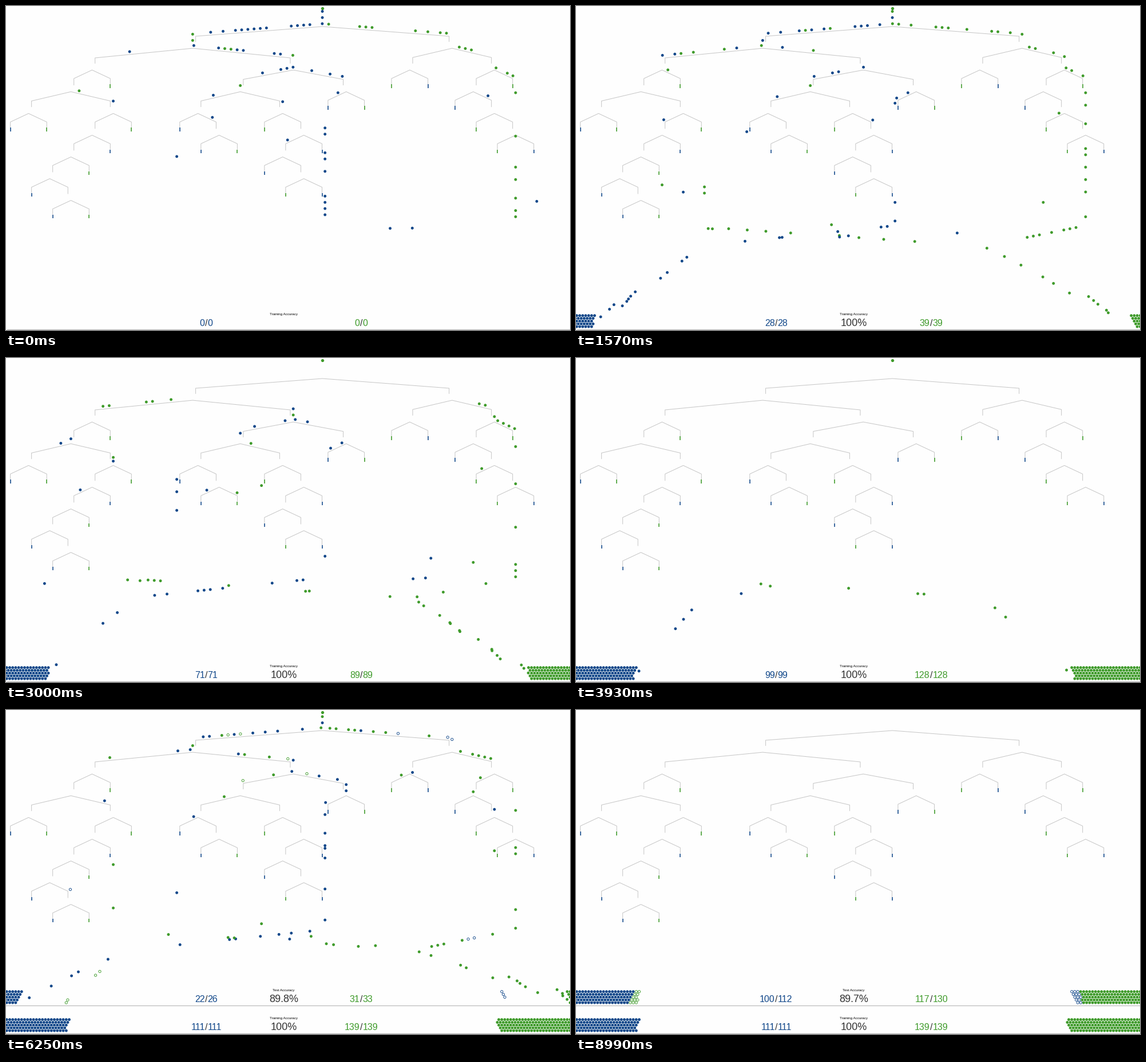
Write a matplotlib script that moves like this. It is 986 px wide and 568 px high and loops after 9.17 s.

```python
import random

import matplotlib.pyplot as plt
import numpy as np
from matplotlib.animation import FuncAnimation
from matplotlib.collections import LineCollection

W, H, DPI = 986, 568, 100
FRAMES, INTERVAL = 262, 35
BLUE, GREEN, GRAY, DARK = "#12488a", "#3f9b2b", "#c6c6c6", "#333333"
STEP = 10.87             # pixels a dot moves per spawn slot
TOP, LEVEL, ELBOW = 31, 38.1, 17.4
INSET = 5.2              # branch feet stop short of the dot columns
FALL_Y = 385             # dots drop to here before they sweep to a pool
HUBS = {"b": (222, 420), "g": (712, 421)}
PITCH, ROW = 5.2, 4.85   # pool lattice
TEST_START = 123
TRAIN_Y, TEST_Y = 0, -49


def px(size):
    return size * 72 / DPI


# ---- decision tree: a leaf is (column, class, weight), a split is [left, right]
def leaf(col, kind, weight):
    return (col, kind, weight)


deep_left = [[[leaf(1, "b", 1), [leaf(2, "b", 1), leaf(4, "g", 2)]],
              leaf(4, "g", 2)], leaf(5, "b", 8)]
far_left = [[[leaf(0, "b", 3), leaf(2, "g", 1)], [deep_left, leaf(6, "g", 3)]],
            leaf(5, "g", 17)]
middle = [[leaf(8, "b", 13), [leaf(9, "b", 3), leaf(11, "g", 1)]],
          [leaf(12, "g", 6),
           [[leaf(12, "b", 2), [leaf(13, "g", 1), leaf(15, "b", 1)]],
            leaf(15, "b", 3)]]]
near_right = [leaf(18, "g", 2), leaf(20, "b", 5)]
far_right = [[leaf(21, "b", 1), [leaf(22, "g", 6),
                                 [leaf(23, "g", 1), leaf(25, "b", 2)]]],
             leaf(24, "g", 58)]
tree = [[far_left, [middle, [leaf(15, "b", 58), leaf(17, "g", 1)]]],
        [near_right, far_right]]


def column(node):
    if isinstance(node, tuple):
        return node[0]
    return (column(node[0]) + column(node[1])) / 2


def node_x(node):
    return 2.4 + 37.02 * column(node)


branches, ticks, tick_colors = [], [], []
leaves = {"b": [], "g": []}


def walk(node, depth, route):
    """Collect the drawn lines and the route to every leaf."""
    x, y = node_x(node), TOP + LEVEL * depth
    if isinstance(node, tuple):
        leaves[node[1]].append((route + [(x, FALL_Y)], node[2]))
        return
    ends = []
    for child, side in zip(node, (-1, 1)):
        cx = node_x(child)
        ex = cx - INSET * side
        ey = y + 5 + ELBOW * (ex - x) / (cx - x)
        if isinstance(child, tuple):
            foot = y + 30
            ticks.append([(ex, foot), (ex, foot + 6.5)])
            tick_colors.append(BLUE if child[1] == "b" else GREEN)
        else:
            foot = y + 31.8
        ends.append([(ex, foot), (ex, ey)])
        walk(child, depth + 1, route + [(x, y), (cx, y + ELBOW)])
    branches.append(ends[0] + [(x, y + 5)] + ends[1][::-1])


walk(tree, 0, [(node_x(tree), 4)])


# ---- pools
def pool_spot(side, right_guess, n, dy):
    col, k = divmod(n, 5)
    if right_guess:
        row = 4 - k
        if side == "b":
            x = 1.3 + PITCH * col - PITCH / 2 * row
        else:
            x = 996.7 - PITCH * col + PITCH / 2 * row
    elif side == "b":
        row = (4, 3, 1, 0, 2)[k]
        x = 110.5 - PITCH * col - PITCH / 2 * row + (PITCH if row > 2 else 0)
    else:
        row = k
        x = 866.8 + PITCH * col + PITCH / 2 * row
    return x, 542.7 + ROW * row + dy


def length(points):
    return np.hypot(*np.diff(points, axis=0).T).sum()


class Dot:
    def __init__(self, kind, side, start, rng):
        routes, weights = zip(*leaves[side])
        self.side, self.start = side, start
        self.right = kind == side
        self.color = BLUE if kind == "b" else GREEN
        self.path = rng.choices(routes, weights)[0] + [HUBS[side]]
        self.arrival = start + length(self.path) / STEP

    def aim(self, spot):
        pts = np.array(self.path + [spot])
        self.x, self.y = pts.T
        steps = np.hypot(*np.diff(pts, axis=0).T)
        self.dist = np.concatenate([[0], np.cumsum(steps)])

    def at(self, clock):
        d = (clock - self.start) * STEP
        return np.interp(d, self.dist, self.x), np.interp(d, self.dist, self.y)


def make_dots(groups, dy, seed, lead=0):
    """Shuffle the groups, with blue ahead of green by the share lead."""
    rng = random.Random(seed)
    kinds = [pair for *pair, count in groups for _ in range(count)]
    kinds.sort(key=lambda pair: rng.random() + lead * (pair[1] == "g"))
    dots = [Dot(kind, side, i, rng) for i, (kind, side) in enumerate(kinds)]
    filled = {}
    for dot in sorted(dots, key=lambda d: d.arrival):
        key = (dot.side, dot.right)
        n = filled.get(key, 0)
        filled[key] = n + 1
        dot.aim(pool_spot(dot.side, dot.right, n, dy))
    return dots


train = make_dots([("b", "b", 111), ("g", "g", 139)], TRAIN_Y, 5, 0.1)
test = make_dots([("b", "b", 100), ("g", "b", 12),
                  ("g", "g", 117), ("b", "g", 13)], TEST_Y, 12)


# ---- clocks, counted in spawn slots
def train_clock(i):
    return np.interp(i, [0, 28, 62, 82, 112, 134],
                     [76.5, 134.8, 246.8, 270, 348, 404])


def test_clock(i):
    return np.interp(i, [TEST_START, 178, 208, 254], [0, 172.7, 292, 400])


def tally(clock, slots, counts):
    return int(np.interp(clock, slots, counts) + 1e-6)


TRAIN_SLOTS = [108, 134.8, 246.8, 348, 385]
TRAIN_COUNTS = [[0, 2, 59, 99, 111]] * 2 + [[0, 10, 73, 128, 139]] * 2
TEST_SLOTS = [108, 172.7, 292, 380]
TEST_COUNTS = [[0, 22, 75, 100], [0, 26, 84, 112],
               [0, 31, 76, 117], [0, 33, 88, 130]]

# ---- stage
plt.rcParams["font.family"] = "Liberation Sans"
fig = plt.figure(figsize=(W / DPI, H / DPI), dpi=DPI, facecolor="#fefefe")
ax = fig.add_axes([0, 0, 1, 1])
ax.set_xlim(0, W)
ax.set_ylim(H, 0)
ax.axis("off")
ax.add_collection(LineCollection(branches, colors=GRAY, linewidths=px(1)))
ax.add_collection(LineCollection(ticks, colors=tick_colors,
                                 linewidths=px(1.6), zorder=3))


class Panel:
    def __init__(self, title, dy):
        def put(x, y, text, size, color, ha="center"):
            return ax.text(x, y + dy, text, fontsize=px(size), color=color,
                           ha=ha, va="baseline", zorder=4)

        self.artists = [ax.plot([0, W], [567 + dy] * 2, color="#bdbdbd",
                                lw=px(1.3), zorder=1)[0],
                        put(485.5, 542.3, title, 6.3, "black")]
        self.numbers = []
        for x, color in ((350, BLUE), (621, GREEN)):
            self.artists.append(put(x, 561.3, "/", 16, DARK))
            self.numbers += [put(x - 2.3, 561.3, "0", 16, color, "right"),
                             put(x + 2.3, 561.3, "0", 16, color, "left")]
        self.percent = put(485.5, 561.3, "", 18, DARK)
        self.artists += self.numbers + [self.percent]

    def update(self, clock, slots, counts, visible=True):
        values = [tally(clock, slots, c) for c in counts]
        for text, value in zip(self.numbers, values):
            text.set_text(str(value))
        total = values[1] + values[3]
        share = 100 * (values[0] + values[2]) / total if total else 0
        self.percent.set_text(f"{round(share, 1):g}%" if total else "")
        for artist in self.artists:
            artist.set_visible(visible)


train_panel = Panel("Training Accuracy", TRAIN_Y)
test_panel = Panel("Test Accuracy", TEST_Y)

solid = ax.scatter([], [], s=px(4.9) ** 2, linewidths=0, zorder=5)
rings = ax.scatter([], [], s=px(4.2) ** 2, linewidths=px(0.9), zorder=5)
stack = ax.scatter([node_x(tree)], [4.3], s=px(5.8) ** 2, marker="H",
                   color=GREEN, linewidths=0, zorder=6)


def place(artist, dots):
    spots = [dot.at(clock) for dot, clock in dots]
    artist.set_offsets(np.array(spots).reshape(-1, 2))
    return [dot.color for dot, _ in dots]


def update(i):
    now, later = train_clock(i), test_clock(i)
    live = [(d, now) for d in train if d.start < now]
    live += [(d, later) for d in test if d.start < later]
    solid.set_facecolor(place(solid, [p for p in live if p[0].right]))
    edge = place(rings, [p for p in live if not p[0].right])
    rings.set_facecolor("white")
    rings.set_edgecolor(edge)
    stack.set_visible(bool(later < len(test)))
    train_panel.update(now, TRAIN_SLOTS, TRAIN_COUNTS)
    test_panel.update(later, TEST_SLOTS, TEST_COUNTS, i >= TEST_START)
    return []


anim = FuncAnimation(fig, update, frames=FRAMES, interval=INTERVAL,
                     init_func=lambda: update(0), repeat=True, repeat_delay=0)
plt.show()
```
